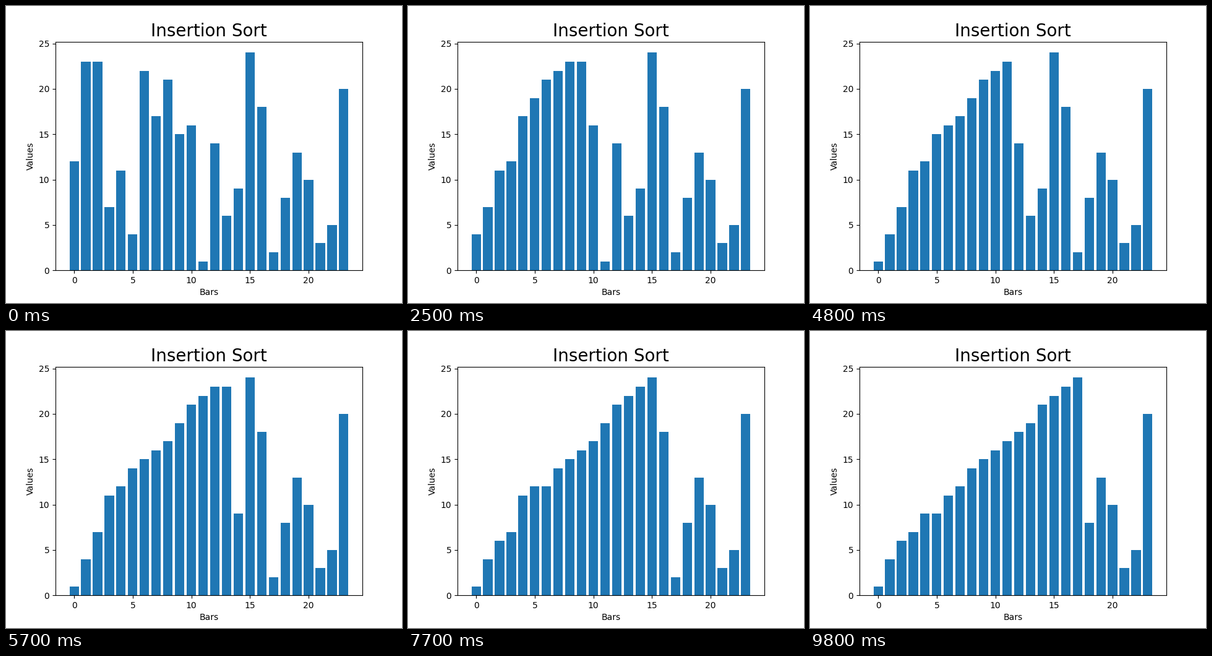
Animation, 640 px wide and 480 px high, one loop 9.9 s. Source, as a matplotlib script:

```python
from itertools import islice

import matplotlib.pyplot as plt
from matplotlib.animation import FuncAnimation

STEPS = 99
STEP_MS = 100
BAR_COLOR = "#1f77b4"

# The unsorted input; every later state follows from the sort itself.
UNSORTED = [12, 23, 19, 7, 11, 4, 22, 17, 21, 15, 16, 1,
            14, 6, 9, 24, 18, 2, 8, 13, 10, 3, 5, 20]


def insertion_sort(values):
    """Yield the list after every shift and every placement."""
    a = list(values)
    for i, key in enumerate(values):
        j = i
        while j > 0 and a[j - 1] > key:
            a[j] = a[j - 1]
            j -= 1
            yield a[:]
        if j < i:
            a[j] = key
            yield a[:]


def make_chart(heights):
    fig, ax = plt.subplots(figsize=(6.4, 4.8), dpi=100)
    bars = ax.bar(range(len(heights)), heights, color=BAR_COLOR)
    ax.set_title("Insertion Sort", fontsize=20)
    ax.set_xlabel("Bars")
    ax.set_ylabel("Values")
    return fig, bars


def update(step):
    for bar, height in zip(bars, states[step]):
        bar.set_height(height)
    return bars.patches


plt.rcParams["font.family"] = "DejaVu Sans"
states = list(islice(insertion_sort(UNSORTED), STEPS))
fig, bars = make_chart(states[0])
anim = FuncAnimation(fig, update, frames=STEPS, interval=STEP_MS,
                     repeat=True, repeat_delay=0)
plt.show()
```
